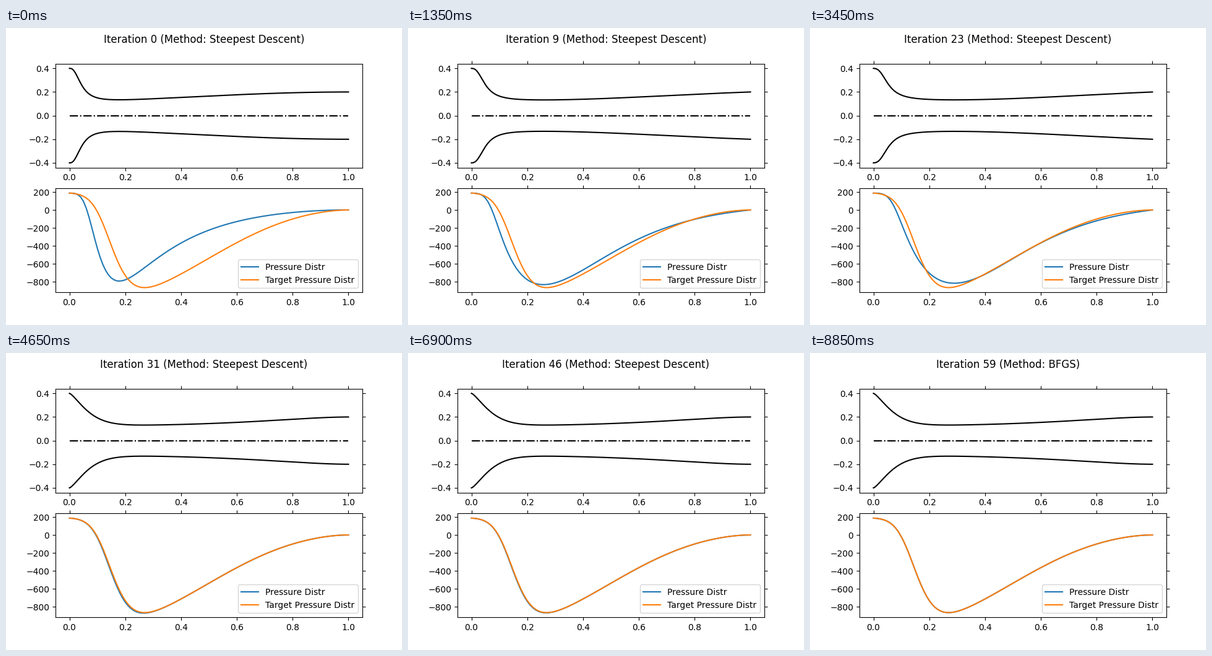
Animation of 640 by 480 pixels, one loop 9000 ms. Source, as a matplotlib script:

```python
import numpy as np
import matplotlib.pyplot as plt
from matplotlib.animation import FuncAnimation

FRAMES, INTERVAL = 60, 150
R_IN, R_OUT, Q_OUT = 0.4, 0.2, 200.0
JUMP_START, JUMP_END, BFGS_START = 23, 29, 54

x = np.linspace(0, 1, 401)
back = 1 - x                   # distance from the outlet
coarse = slice(None, None, 4)


def relax(start, end, tau, i):
    return end + (start - end) * np.exp(-i / tau)


def with_inlet(diffuser, inlet):
    """Add the inlet funnel (1 at x=0, falling to 0) to the diffuser."""
    return diffuser + (R_IN - diffuser[0]) * inlet


def bell_nozzle(i):
    """S-shaped inlet whose throat creeps downstream, ever more slowly."""
    s = relax(0, .098, 5, i)
    u = relax(.185, .104, 5, i)
    v = relax(.09, .148, 6.5, i)
    width = relax(.0443, .0555, 14, i)
    power = relax(2.48, 2.75, 14, i)
    diffuser = R_OUT - back * (s + u * back - v * back ** 2)
    return with_inlet(diffuser, 1 / (1 + (x / width) ** power))


def cone_nozzle(width):
    """Nearly straight inlet, as in the optimum."""
    diffuser = R_OUT - .856 * back ** 2 * np.exp(-(2.96 - .53 * back) * back)
    return with_inlet(diffuser, np.exp(-(x / width) ** 1.35))


def radius(i):
    jump = np.clip((i - JUMP_START) / (JUMP_END - JUMP_START), 0, 1)
    width = np.interp(i, [JUMP_END, FRAMES], [.0775, .079])
    return (1 - jump) * bell_nozzle(i) + jump * cone_nozzle(width)


def pressure(r):
    return Q_OUT * (1 - (R_OUT / r[coarse]) ** 4)


fig, (top, bottom) = plt.subplots(2, 1, figsize=(6.4, 4.8), dpi=100)
title = fig.suptitle("")

r0 = radius(0)
upper, = top.plot(x, r0, "k")
lower, = top.plot(x, -r0, "k")
top.plot([0, 1], [0, 0], "k-.")

curve, = bottom.plot(x[coarse], pressure(r0), label="Pressure Distr")
bottom.plot(x[coarse], pressure(cone_nozzle(.079)),
            label="Target Pressure Distr")
bottom.legend(loc="lower right")


def update(i):
    r = radius(i)
    upper.set_ydata(r)
    lower.set_ydata(-r)
    curve.set_ydata(pressure(r))
    for ax in (top, bottom):
        ax.tick_params(top=i > 0, right=i > 0)
    method = "Steepest Descent" if i < BFGS_START else "BFGS"
    title.set_text(f"Iteration {i} (Method: {method})")
    return upper, lower, curve, title


anim = FuncAnimation(fig, update, frames=FRAMES, interval=INTERVAL,
                     init_func=lambda: update(0), repeat=True, repeat_delay=0)
plt.show()
```
